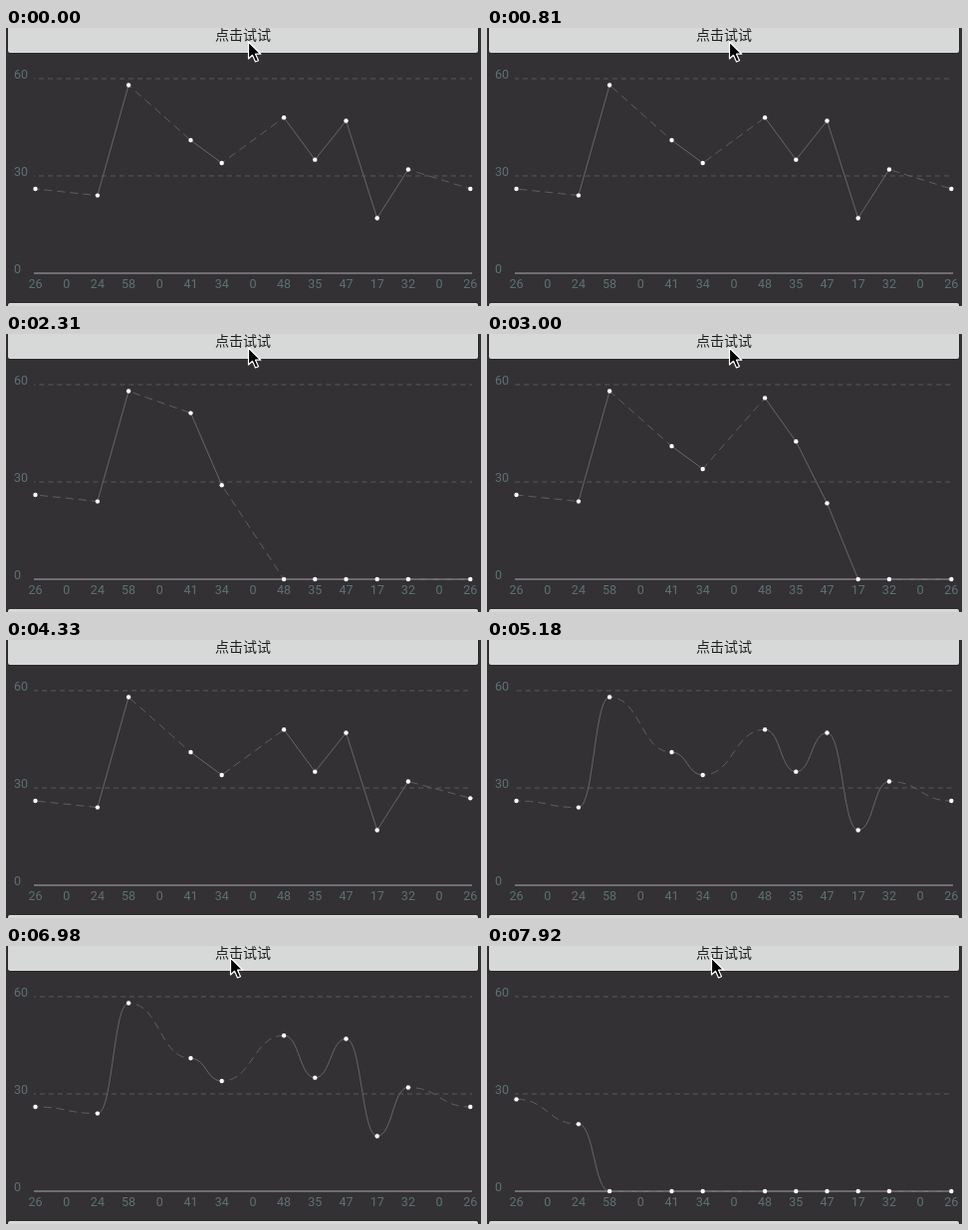
Write an HTML page that moves like this. It is 477 px wide and 280 px high and loops after 8 s.

```html
<!DOCTYPE html>
<html lang="zh">
<head>
<meta charset="utf-8">
<style>
html, body { margin: 0; width: 100%; height: 100%; overflow: hidden; background: #333133; }
svg { display: block; width: 477px; height: 280px; }
path, line { fill: none; }
.num { font: 12.5px Roboto, sans-serif; fill: #5d7176; }
.mid { text-anchor: middle; }
.btn { fill: #d6d9d8; }
.label { font: 14px "Noto Sans CJK SC", "Noto Sans CJK", sans-serif; fill: #202020; }
.grid { stroke: #5b595b; stroke-dasharray: 5 4; }
.seg { stroke: #686668; }
.dashed { stroke: #605e60; stroke-dasharray: 8 5; }
.axis { stroke: #858385; stroke-width: 1.5; }
.dot { fill: #fff; }
#cursor { fill: #000; stroke: #fff; stroke-width: 1.2; stroke-linejoin: round; }
</style>
</head>
<body>
<svg viewBox="0 0 477 280">
  <rect x="1" y="-20" width="474" height="46" rx="3" fill="#2a282a"/>
  <rect class="btn" x="2" y="-20" width="472" height="45" rx="2"/>
  <text class="label mid" x="238" y="12">点击试试</text>
  <rect x="1" y="276" width="474" height="20" rx="3" fill="#2a282a"/>
  <rect class="btn" x="2" y="277" width="472" height="20" rx="2"/>
  <g id="chart"></g>
  <path id="cursor" d="M0 0V17L4 13.3 7 20 10 18.7 7 12.2H12.3Z"/>
</svg>
<script>
const LOOP = 8000, STAGGER = 0.3;
const values = [26, 0, 24, 58, 0, 41, 34, 0, 48, 35, 47, 17, 32, 0, 26];
const chart = document.getElementById('chart');
const cursor = document.getElementById('cursor');

const px = i => 29.5 + 31.2 * i;
const py = v => 247 - v * 98 / 30;

function add(tag, cls, attrs, text = '') {
  const el = document.createElementNS('http://www.w3.org/2000/svg', tag);
  el.setAttribute('class', cls);
  for (const k in attrs) el.setAttribute(k, attrs[k]);
  el.textContent = text;
  chart.append(el);
  return el;
}

for (const v of [60, 30, 0]) add('text', 'num', { x: 8, y: py(v) }, v);
values.forEach((v, i) => add('text', 'num mid', { x: px(i), y: 262 }, v));
const grids = [60, 30].map(v => add('path', 'grid', { d: `M28 ${py(v)}H468` }));
add('path', 'axis', { d: 'M28 247H468' });

// Zero entries have no dot; dashed segments bridge them.
const points = values.map((v, i) => ({ v, i })).filter(p => p.v);
const segs = points.slice(1).map((b, k) => {
  const a = points[k], gap = b.i - a.i > 1;
  return { a, b, gap, el: add('path', gap ? 'dashed' : 'seg', {}) };
});
for (const p of points) p.el = add('circle', 'dot', { r: 2.2, cx: px(p.i) });

function overshoot(t) {
  const u = Math.min(1, Math.max(0, t)) - 1;
  return u * u * (4 * u + 3) + 1;
}

// Time since the last restart, in units of one dot's rise.
function progress(t) {
  if (t < 1065) return 9;
  if (t < 3000) return (t - 1065) / 625;
  if (t < 7423) return 3.095 + (t - 3000) / 668;
  return (t - 7423) / 625;
}

function draw(t) {
  const run = progress(t), curved = t >= 5000;
  const phase = 4 + t * 0.0076;

  for (const p of points) {
    p.y = py(p.v * overshoot(run - p.i * STAGGER));
    p.el.setAttribute('cy', p.y);
  }
  for (const { a, b, gap, el } of segs) {
    const x1 = px(a.i), x2 = px(b.i), m = (x1 + x2) / 2;
    const bend = curved ? `C${m} ${a.y} ${m} ${b.y} ` : 'L';
    el.setAttribute('d', `M${x1} ${a.y}${bend}${x2} ${b.y}`);
    if (gap) el.setAttribute('stroke-dashoffset', phase);
  }
  for (const g of grids) g.setAttribute('stroke-dashoffset', phase);

  const left = t >= 5860;
  cursor.setAttribute('transform', left ? 'translate(225.5 12)' : 'translate(243.5 14)');
  cursor.setAttribute('visibility', t < 4000 || left ? 'visible' : 'hidden');
}

function tick() {
  draw(performance.now() % LOOP);
  requestAnimationFrame(tick);
}
tick();
</script>
</body>
</html>
```
